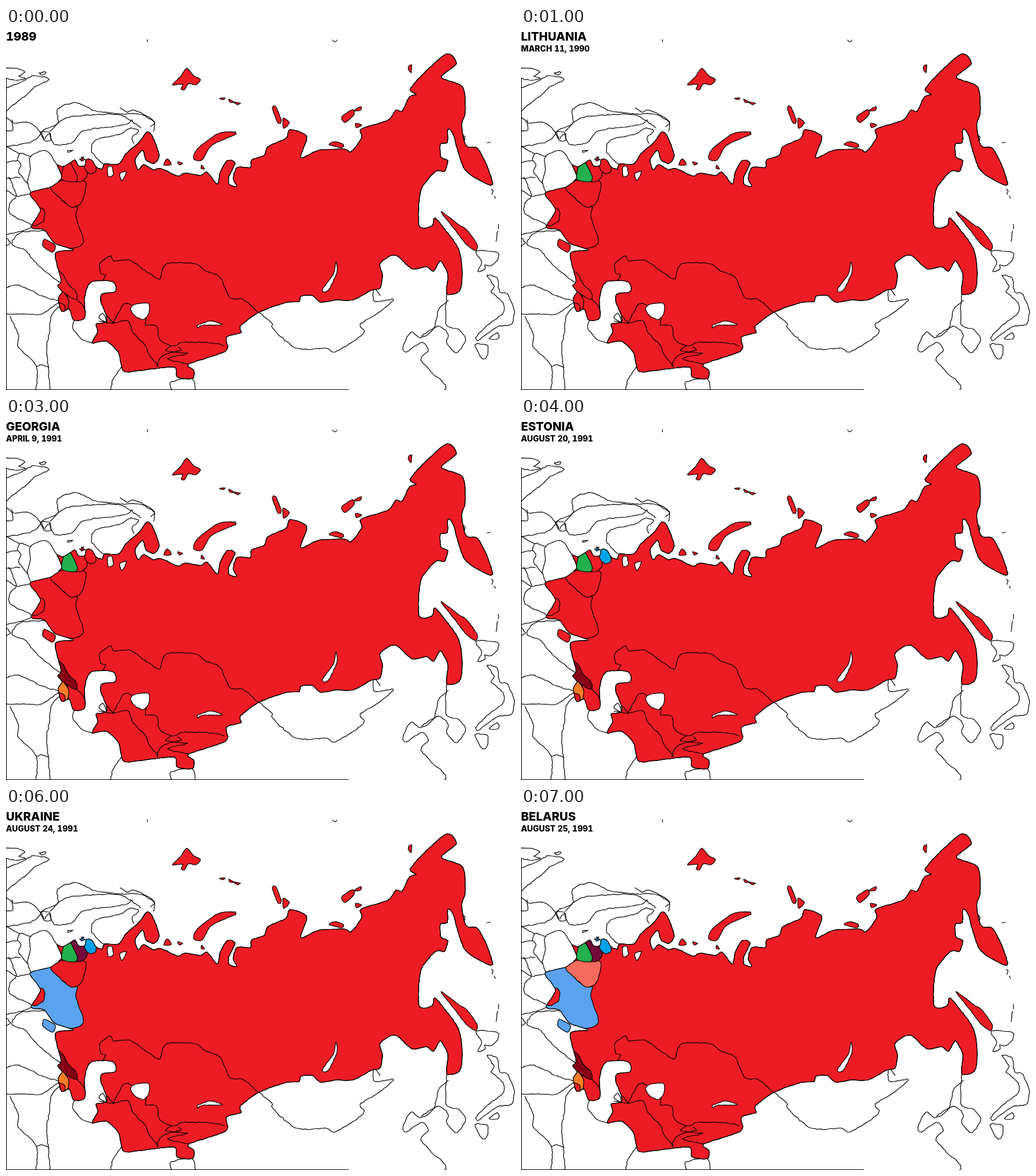
These frames come from a looping animation (887x631 px, 8 s). An HTML page:

```html
<!DOCTYPE html>
<html lang="en">
<head>
<meta charset="utf-8">
<title>Dissolution map</title>
<style>
html, body { margin: 0; width: 100%; height: 100%; overflow: hidden; background: #fff; }
svg { display: block; width: 887px; height: 631px; }
path { stroke: #000; stroke-width: 1.25; stroke-linejoin: round; stroke-linecap: round; }
text { font-family: Inter, "Liberation Sans", sans-serif; font-weight: 800; font-feature-settings: "tnum"; }
#title { font-size: 20.5px; }
#date { font-size: 14px; }
</style>
</head>
<body>
<svg viewBox="0 0 887 631">
  <defs><clipPath id="inside"></clipPath></defs>
  <g id="back"></g>
  <g id="states" clip-path="url(#inside)"></g>
  <g id="front"></g>
  <path d="M.5 88V631M0 630.5H597M246.5 20V24M569 21Q573 27 577 21" fill="none"/>
  <text id="title" y="21.5"></text>
  <text id="date" y="41.3"></text>
</svg>
<script>
const RED = '#ed1c24';
const [back, states, front, inside, title, date] =
  ['back', 'states', 'front', 'inside', 'title', 'date'].map(id => document.getElementById(id));

let seed = 7;
const jitter = size => {
  seed = seed * 16807 % 2147483647;
  return (seed / 2147483647 - 0.5) * 2 * size;
};

// Soft curve through "x,y x,y ..."; rough adds a small seeded wobble
function curve(points, closed, rough) {
  const p = points.trim().split(/\s+/).map(s => s.split(',').map(Number));
  const n = p.length, k = 0.4;
  const at = i => closed ? p[(i + n) % n] : p[Math.max(0, Math.min(n - 1, i))];
  let d = 'M' + p[0];
  for (let i = 0; i < (closed ? n : n - 1); i++) {
    const [a, b, c, e] = [at(i - 1), at(i), at(i + 1), at(i + 2)];
    const steps = Math.max(1, Math.round(Math.hypot(c[0] - b[0], c[1] - b[1]) / 4));
    for (let j = 1; j <= steps; j++) {
      const t = j / steps, t2 = t * t, t3 = t2 * t;
      const wobble = j < steps ? rough : 0;
      const q = [0, 1].map(m =>
        (2 * t3 - 3 * t2 + 1) * b[m] + (3 * t2 - 2 * t3) * c[m] +
        (t3 - 2 * t2 + t) * (c[m] - a[m]) * k + (t3 - t2) * (e[m] - b[m]) * k + jitter(wobble));
      d += 'L' + q.map(v => v.toFixed(1));
    }
  }
  return closed ? d + 'z' : d;
}

function draw(layer, d, fill) {
  const path = document.createElementNS('http://www.w3.org/2000/svg', 'path');
  path.setAttribute('d', d);
  path.setAttribute('fill', fill);
  layer.append(path);
  return path;
}
const coast = points => draw(back, curve(points, false, 0.9), 'none');
const shore = points => draw(back, curve(points, true, 0.9), 'none');
const border = points => draw(front, curve(points, false, 0.8), 'none');
const island = points => draw(front, curve(points, true, 0.3), RED);
const lake = points => draw(front, curve(points, true, 0.5), '#fff');

// Union outline, clockwise from the Baltic
const baltic = `89,238 98,242 110,236 120,230 126,240 137,240 140,229 149,230 158,243 168,246 171,237
  196,237 209,219 229,202 247,181`;
const whiteSea = `259,197 267,223 258,236 244,230 238,213 225,230 230,247 240,238 256,247 270,245
  299,258 312,253 340,257 350,251 368,272`;
const arctic = `373,252 385,231 399,235 388,260 389,273 402,276 396,262 403,243 426,243 428,230 450,222
  456,207 488,192 495,177 524,189 514,226 545,213 590,211 601,216 620,191 619,176 665,161 680,143
  690,145 703,120 715,116 704,107 727,80 768,45`;
const pacific = `785,62 759,86 796,103 800,148 794,170 802,205 822,210 840,245 846,274 800,247 779,185
  770,177 769,200 757,202 758,225 770,231 764,250 749,250 723,283 720,345 742,345 747,331 764,350`;
const amur = `789,386 795,430 790,459 768,463 770,430 757,406 745,424 733,416 708,420 678,396 652,410
  656,430 652,453`;
const steppe = `637,457 605,474 575,474 548,478 533,466 513,468 511,477 486,479 440,496 408,520 410,531
  384,539 383,563 318,586 327,596 325,611 298,608 293,591 235,597 205,598 196,566 175,546 150,549`;
const caspian = `160,529 157,516 174,513 175,502 165,475 168,463 191,459 186,442 148,443 137,470 137,505
  118,509 110,490 97,494 91,471 98,460 90,449`;
const west = '96,440 86,393 117,387 85,375 67,352 44,347 60,317 42,288 76,278 97,261';
const land = curve([baltic, whiteSea, arctic, pacific, amur, steppe, caspian, west].join(' '), true, 0.4);

// North Sea and Scandinavia
coast('0,70 18,70 33,77 22,84 34,88 15,91 0,88');
coast('0,104 27,94 49,83 75,90 49,103 40,113 9,137 0,145');
shore('58,78 70,77 63,82');
coast('0,155 14,166 40,165 60,183 43,199 0,207');
coast('0,180 12,178 10,160');
coast('66,193 64,179 90,166 90,141 122,130 155,144 199,150 232,150 258,164 257,180');
coast('77,180 108,156 195,151 235,174');
coast('68,193 76,184 84,203 115,200 135,179 205,169 220,160');
coast('196,237 170,237 149,215 156,195 198,185 218,174 231,180 220,190 223,201');
coast('199,139 211,147 222,143 243,152 259,164 252,172');
shore('61,181 76,182 78,196 66,195');
shore('107,214 117,213 108,217');
// Central Europe
coast('89,238 70,214 43,224 42,249 37,268 43,287');
coast('0,235 20,231 26,240 22,252 38,271');
coast('20,231 24,219 43,224');
coast('0,262 25,260');
coast('5,260 18,293 7,305 7,324 45,343');
coast('0,282 18,293 42,289');
coast('0,207 24,219');
// Black Sea, Anatolia and Iran
coast('0,360 30,353 44,348');
coast('67,354 27,356 10,376 33,387 50,407 72,427 96,445');
coast('0,366 8,374 0,380');
coast('0,453 20,448 46,458 59,466 92,476');
coast('0,498 35,499 64,498 92,477');
coast('7,503 22,536 21,556 53,589 52,631');
coast('96,484 80,500 75,534 71,561 77,631');
coast('53,590 63,587 75,592');
coast('125,503 116,520 130,541 150,549');
coast('203,590 186,613 183,631');
coast('289,631 287,617 325,612 330,631');
// Mongolia, China, Korea
coast('440,496 463,514 466,525 506,558 558,558 573,565 617,538 624,526 617,517 655,492 675,473 651,477 640,474 641,453 652,466');
coast('768,463 767,517 786,524 801,543 785,566 768,548 771,535 755,520 724,537');
coast('771,475 754,491 745,524 722,540 706,530 692,555 698,565 724,548 736,561 723,580 766,622 764,631');
// Japan and the Kurils
shore('819,389 856,391 857,404 843,415 834,413 835,420 822,424 829,408');
shore('838,431 856,436 860,460 873,463 886,492 880,517 856,521 821,545 818,540 835,522 866,497 866,478 845,460 851,450');
shore('817,552 839,553 838,572 831,577');
shore('842,541 856,531 858,541');
coast('846,281 849,284 847,290');
coast('851,293 853,297');
coast('858,342 858,350');
coast('857,354 854,372');
coast('838,200 844,199');

draw(back, land, RED);
draw(inside, land, RED);

// Republics overlap freely; later ones cover earlier ones and the outline trims them
const changes = [];
function state(step, color, points) {
  changes.push({ step, color, path: draw(states, curve(points, true, 0.7), RED) });
}
const islet = (step, color, points) => changes.push({ step, color, path: island(points) });

const UKRAINE = '#5ba3ee', ESTONIA = '#00a2e8';
state(6, UKRAINE, '36,284 77,277 95,297 113,312 125,312 122,330 135,373 114,384 60,382 36,350');
state(99, RED, '62,314 68,323 64,338 46,344 44,322');
state(7, '#f56b5d', '77,277 104,264 137,267 137,288 130,306 113,312 95,297');
state(5, '#740a3c', '108,228 124,224 126,240 138,240 141,258 130,268 110,262');
state(1, '#22b14c', '98,250 103,234 111,234 124,258 121,268 98,264');
state(4, ESTONIA, '136,224 154,224 157,244 156,251 146,254 138,246');
state(99, RED, '107,466 124,473 137,490 139,508 116,512 109,490');
state(3, '#880015', '80,420 97,427 109,447 121,458 124,472 113,470 99,460 80,452');
state(2, '#ff7f27', '88,462 101,461 109,475 107,490 103,493 102,483 88,476');
draw(front, land, 'none');
islet(4, ESTONIA, '128,228 138,229 132,232');
islet(4, ESTONIA, '131,225 136,225 133,228');
islet(6, UKRAINE, '64,375 67,368 86,379 81,391 65,381');

// Islands
island('315,70 327,83 339,90 331,99 318,97 311,108 305,106 308,98 290,99 304,85');
island('372,123 382,122 379,125');
island('388,124 397,129 391,130');
island('396,129 409,131 404,134');
island('400,181 401,185 358,205 342,230 327,228 334,210 370,184');
island('464,139 470,137 480,162 474,166');
island('483,157 494,165 484,175');
island('585,155 604,142 607,150 591,165');
island('606,144 619,137 617,144');
island('609,166 620,169 611,174');
island('703,65 707,64 706,78 701,72');
island('275,239 281,228 288,238');
island('299,233 308,236 302,239');
island('341,239 346,246 340,245');
island('563,203 574,198 588,203 585,209');
island('758,320 788,342 803,352 821,377 818,388 802,377 781,350');

// Central Asian borders
border('168,441 174,430 165,428 164,410 183,397 187,406 213,404 232,415 266,438 271,426 282,410 330,411 348,424 373,434 390,470 413,473 440,496');
border('162,511 187,515 212,510 222,532 243,553 248,567 265,590');
border('187,514 205,481 219,483');
border('187,515 176,502');
border('246,500 243,518 262,519 268,543 291,554 309,548 360,549 380,554');
border('288,554 278,562 304,566 317,567 288,574 283,578 318,586');
border('300,556 306,562 285,566 268,576 263,590');

// Lakes
lake('177,243 184,241 187,256 178,259');
lake('198,254 210,250 202,266');
lake('575,408 577,424 562,457 551,457 571,428');
lake('217,490 224,482 248,480 249,497 240,508 226,503');
lake('333,519 355,511 377,517 343,518 334,523');
lake('162,505 169,497 175,512');
lake('797,187 800,190 799,196');

const captions = [
  ['1989', ''],
  ['LITHUANIA', 'MARCH 11, 1990'],
  ['ARMENIA', 'AUGUST 23, 1990'],
  ['GEORGIA', 'APRIL 9, 1991'],
  ['ESTONIA', 'AUGUST 20, 1991'],
  ['LATVIA', 'AUGUST 21, 1991'],
  ['UKRAINE', 'AUGUST 24, 1991'],
  ['BELARUS', 'AUGUST 25, 1991'],
];

let shown = -1;
function show(step) {
  if (step === shown) return;
  shown = step;
  [title.textContent, date.textContent] = captions[step];
  for (const c of changes) c.path.setAttribute('fill', step >= c.step ? c.color : RED);
}
function tick(now) {
  show(Math.floor(now / 1000) % captions.length);
  requestAnimationFrame(tick);
}
show(0);
requestAnimationFrame(tick);
</script>
</body>
</html>
```
